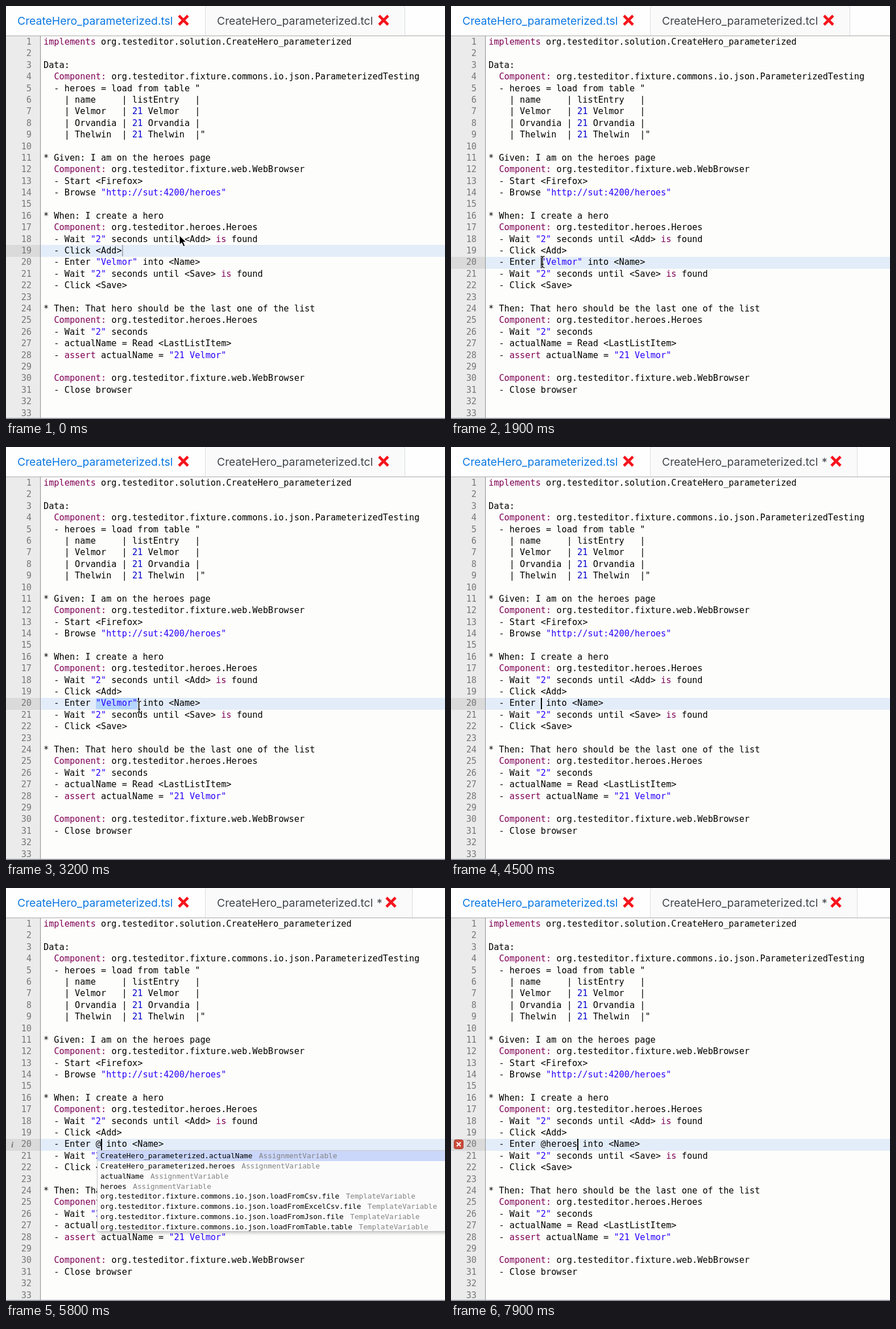
An HTML page for the animation above (8 s loop, 772 px wide and 726 px high).

```html
<!DOCTYPE html>
<html lang="en">
<head>
<meta charset="utf-8">
<style>
html, body { margin: 0; width: 100%; height: 100%; overflow: hidden; background: #fdfdfb; }
#stage { position: absolute; left: 0; top: 0; width: 772px; height: 726px; overflow: hidden; }
#stage div, #stage pre, #stage svg { position: absolute; box-sizing: border-box; margin: 0; }
pre { font: 15.25px/20.39px "DejaVu Sans Mono", monospace; color: #000; white-space: pre; }
#header { left: 0; top: 0; width: 772px; height: 53px; background: #fefefe; border-bottom: 1px solid #a9a9a9; }
.tab { font: 19.35px/24px Inter, sans-serif; top: 14px; white-space: pre; color: #40454a; }
#active { left: 350px; top: -1px; height: 53px; background: #fafafa; border: 1px solid #d9dce0; border-bottom: 0; border-radius: 5px 5px 0 0; }
.cross { top: 14px; width: 22px; height: 22px; }
#gutter { left: 0; top: 53px; width: 61px; height: 673px; background: #ebebeb; border-right: 1px solid #8c8c8c; }
#numbers { left: 0; top: 53px; width: 45px; text-align: right; color: #777; }
#line { left: 61px; width: 711px; height: 21px; background: #e3edf9; }
#lineGutter { left: 0; width: 60px; height: 21px; background: #dadada; }
#selection { left: 158px; top: 441px; height: 20px; background: #b5d5ff; border-radius: 2px; }
#code { left: 66px; top: 53px; }
#caret { width: 2px; height: 20px; }
#info { left: 9px; top: 441px; font: italic bold 15px/20px "Liberation Serif", serif; color: #777; }
#error { left: 5px; top: 442px; width: 17px; height: 17px; }
#popup { left: 160px; top: 461px; width: 640px; height: 143px; overflow: hidden; background: #fbfbfb; border: 1px solid #c8c8c8; box-shadow: 2px 3px 5px rgba(0,0,0,.2); }
#popup pre { left: 5px; top: 0; font-size: 12.7px; line-height: 17.85px; }
#bar { left: 0; top: 0; width: 100%; height: 17.5px; background: #cad6fa; }
#bottom { left: 0; top: 724px; width: 772px; height: 2px; background: #9598a0; }
.key { color: #7f0055; }
.str { color: #2a00ff; }
.num { color: #0000cd; }
.meta { color: #828282; margin-left: 11.5px; }
.hit { color: #2d69c7; }
</style>
</head>
<body>
<div id="stage">
  <div id="header"></div>
  <div id="active"></div>
  <div class="tab" style="left:20px;color:#0b78e3">CreateHero_parameterized.tsl</div>
  <div class="tab" style="left:371px">CreateHero_parameterized.tcl</div>
  <div class="tab" id="star" style="left:652px">*</div>
  <svg class="cross" style="left:301px" viewBox="0 0 22 22"><path d="M3 3L19 19M19 3L3 19" stroke="#f5141c" stroke-width="4.6"/></svg>
  <svg class="cross" id="close" viewBox="0 0 22 22"><path d="M3 3L19 19M19 3L3 19" stroke="#f5141c" stroke-width="4.6"/></svg>
  <div id="gutter"></div>
  <div id="line"></div>
  <div id="lineGutter"></div>
  <pre id="numbers"></pre>
  <div id="info">i</div>
  <svg id="error" viewBox="0 0 17 17"><rect x=".5" y=".5" width="16" height="16" rx="3" fill="#cb4a38" stroke="#a83a2c"/><path d="M5 5L12 12M12 5L5 12" stroke="#fff" stroke-width="2"/></svg>
  <div id="selection"></div>
  <pre id="code"></pre>
  <div id="caret"></div>
  <div id="popup"><div id="bar"></div><pre id="list"></pre></div>
  <div id="bottom"></div>
  <svg id="mouse" width="30" height="30" style="overflow:visible">
    <defs><path id="ink" d="M-3.5 -10Q0 -10 0 -7V7Q0 10 -3.5 10M3.5 -10Q0 -10 0 -7V7Q0 10 3.5 10M-2 4H2"/></defs>
    <path id="arrow" d="M0 0V17L4 13.4L7 20L10 18.7L7.2 12.2H12.4Z" fill="#000" stroke="#fff" stroke-width="1.2"/>
    <g id="beam" fill="none">
      <use href="#ink" stroke="#fff" stroke-width="3"/>
      <use href="#ink" stroke="#111" stroke-width="1.4"/>
    </g>
  </svg>
</div>
<script>
const LOOP = 8000, TOP = 53, PITCH = 20.39, CHAR = 9.18;
const PRESS = 1900, RELEASE = 2900, ERASE = 4100, AT = 5250, NOTE = 5400, SUGGEST = 5500, FILTER = 6000, INSERT = 7500;
const $ = id => document.getElementById(id);

const source = arg => `implements org.testeditor.solution.CreateHero_parameterized

Data:
  Component: org.testeditor.fixture.commons.io.json.ParameterizedTesting
  - heroes = load from table "
    | name     | listEntry   |
    | Velmor   | 21 Velmor   |
    | Orvandia | 21 Orvandia |
    | Thelwin  | 21 Thelwin  |"

* Given: I am on the heroes page
  Component: org.testeditor.fixture.web.WebBrowser
  - Start <Firefox>
  - Browse "http://sut:4200/heroes"

* When: I create a hero
  Component: org.testeditor.heroes.Heroes
  - Wait "2" seconds until <Add> is found
  - Click <Add>
  - Enter ${arg} into <Name>
  - Wait "2" seconds until <Save> is found
  - Click <Save>

* Then: That hero should be the last one of the list
  Component: org.testeditor.heroes.Heroes
  - Wait "2" seconds
  - actualName = Read <LastListItem>
  - assert actualName = "21 Velmor"

  Component: org.testeditor.fixture.web.WebBrowser
  - Close browser`;

const paint = text => text.replace(/</g, "&lt;").replace(
  /("[^"\n]+")|\b(21)\b|\b(?:implements|Component:|is\b|assert)/g,
  (s, str, num) => `<span class="${str ? "str" : num ? "num" : "key"}">${s}</span>`);

const own = ["CreateHero_parameterized.actualName", "CreateHero_parameterized.heroes"];
const fixture = "org.testeditor.fixture.", load = fixture + "commons.io.json.loadFrom", web = fixture + "web.";
const allItems = [...own, "actualName", "heroes",
  ...["Csv.file", "ExcelCsv.file", "Json.file", "Table.table"].map(s => load + s)];
const hItems = ["heroes", ...own,
  ...["angularjs.checkEnabled.element", "angularjs.materialdesign.checkEnabled.element", "checkEnabled.element"].map(s => web + s),
  "org.testeditor.heroes.CreateHero.actualName", web + "angularjs.materialdesign.startFireFoxPortable.path"];

const listHtml = (items, hit) => items.map(s => {
  const kind = s.includes(fixture) ? "TemplateVariable" : "AssignmentVariable";
  const name = hit ? s.replace(/h/i, '<span class="hit">$&</span>') : s;
  return `${name}<span class="meta">${kind}</span>`;
}).join("\n");
const fullList = listHtml(allItems, false), filteredList = listHtml(hItems, true);

$("numbers").textContent = Array.from({ length: 33 }, (_, i) => i + 1).join("\n");

const show = (id, on) => $(id).style.visibility = on ? "visible" : "hidden";
const place = (id, props) => {
  for (const k in props) $(id).style[k] = props[k] + "px";
};
const cache = {};
const fill = (id, html) => {
  if (cache[id] !== html) $(id).innerHTML = cache[id] = html;
};
const ease = (t, from, to) => {
  const p = Math.min(1, Math.max(0, (t - from) / (to - from)));
  return p * p * (3 - 2 * p);
};

function draw(t) {
  const arg = t < ERASE ? '"Velmor"' : t < AT ? "" : t < FILTER ? "@" : t < INSERT ? "@h" : "@heroes";
  const row = t < PRESS ? 19 : 20;
  const y = Math.ceil(TOP + (row - 1) * PITCH - 0.1);
  const drag = ease(t, PRESS + 100, RELEASE);
  const selected = t < ERASE ? Math.round(drag * 8) : 0;
  const column = t < PRESS ? 15 : 10 + (t < ERASE ? selected : arg.length);
  const lastAction = [0, PRESS, RELEASE, ERASE, AT, FILTER, INSERT].filter(a => a <= t).pop();
  const dirty = t >= ERASE;

  fill("code", paint(source(arg)));
  place("line", { top: y });
  place("lineGutter", { top: y });
  place("caret", { left: Math.round(66.3 + column * CHAR), top: y });
  $("caret").style.background = t < PRESS ? "#a9adb3" : "#000";
  show("caret", (t - lastAction) % 1000 < 600);
  show("selection", selected);
  place("selection", { width: selected * CHAR });

  show("star", dirty);
  place("active", { width: dirty ? 365 : 352 });
  place("close", { left: dirty ? 666 : 653 });

  show("info", t >= NOTE && t < FILTER + 200);
  show("error", t >= FILTER + 200);
  show("popup", t >= SUGGEST && t < INSERT);
  fill("list", t < FILTER ? fullList : filteredList);

  const move = ease(t, 100, 1500);
  const still = move === 0;
  place("mouse", { left: 305 - 144 * move + 73 * drag, top: 403 + 47 * move + 7 * drag });
  show("mouse", !dirty);
  $("arrow").style.display = still ? "" : "none";
  $("beam").style.display = still ? "none" : "";
}

function tick() {
  draw(Math.floor(performance.now() % LOOP / 100) * 100);
  requestAnimationFrame(tick);
}
tick();
</script>
</body>
</html>
```
